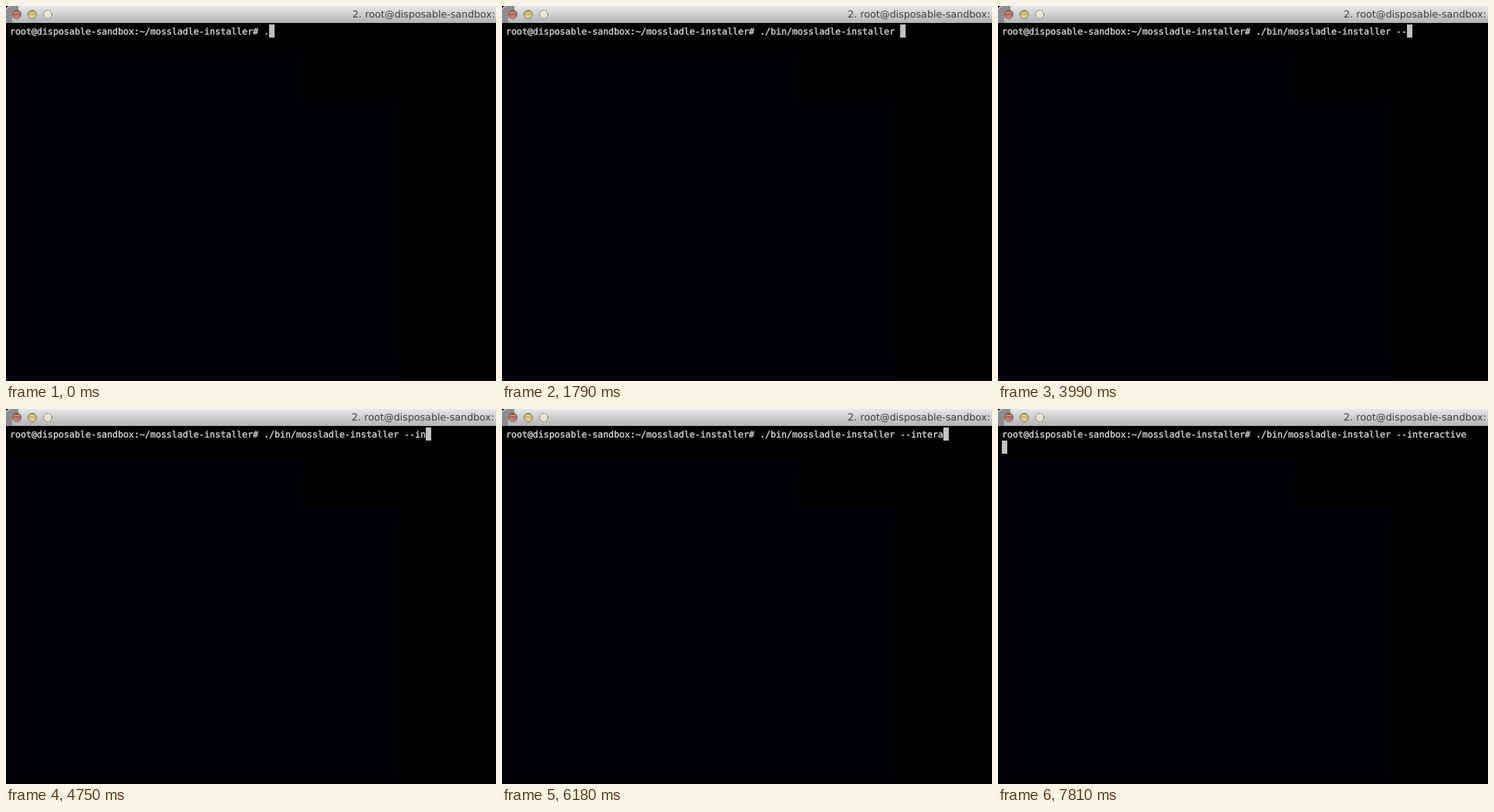
Recreate the animation shown at these times as an HTML page. Size 635 by 487 pixels, loop 8000 ms.

```html
<!DOCTYPE html>
<html lang="en">
<head>
<meta charset="utf-8">
<title>Terminal</title>
<style>
  html, body { margin: 0; width: 100%; height: 100%; overflow: hidden; background: #000; }
  #stage { position: relative; width: 635px; height: 487px; overflow: hidden; }
  svg { position: absolute; left: 0; top: 0; }
  #title {
    position: absolute; left: 448px; top: 2px;
    font: 12.73px/19px "DejaVu Sans", sans-serif;
    color: #404040; white-space: pre; text-rendering: geometricPrecision;
  }
  #shell {
    position: absolute; left: 5px; top: 25px; margin: 0;
    font: 11.635px/17px "DejaVu Sans Mono", monospace;
    color: #d2d2d2; -webkit-text-stroke: .4px #d2d2d2;
    text-rendering: geometricPrecision; font-variant-ligatures: none;
  }
  #cursor { position: absolute; width: 7px; height: 17px; background: #c2c2c2; }
</style>
</head>
<body>
<div id="stage">
  <svg width="635" height="487">
    <defs>
      <linearGradient id="bar" x2="0" y2="1">
        <stop offset="0" stop-color="#e9e9e9"/>
        <stop offset="1" stop-color="#b3b3b3"/>
      </linearGradient>
      <linearGradient id="red" x2="0" y2="1">
        <stop offset="0" stop-color="#8d4a42"/>
        <stop offset="1" stop-color="#d9917f"/>
      </linearGradient>
      <linearGradient id="amber" x2="0" y2="1">
        <stop offset="0" stop-color="#b39a58"/>
        <stop offset="1" stop-color="#f0e2a6"/>
      </linearGradient>
    </defs>
    <path d="M0 64H384V128H512V487H0Z" fill="#00000a"/>
    <rect width="635" height="22" fill="url(#bar)"/>
    <path d="M0 0H16V8H8V22H0Z" fill="#8c8c8c"/>
    <path d="M0 0H4Q1 1 0 4Z" fill="#111"/>
    <path d="M0 5Q1 1 5 .5" fill="none" stroke="#eee"/>
    <circle cx="14" cy="11" r="5.5" fill="url(#red)" stroke="#7c5650"/>
    <circle cx="34" cy="11" r="5.5" fill="url(#amber)" stroke="#85734a"/>
    <circle cx="54" cy="11" r="5.5" fill="#e6e3cf" stroke="#55554a" stroke-dasharray="2 1.5"/>
    <path d="M11 8.5h6M31 8.5h6M51 8.5h6" stroke="#fff" stroke-opacity=".55" stroke-linecap="round"/>
  </svg>
  <div id="title">2. root@disposable-sandbox: ~</div>
  <pre id="shell"></pre>
  <div id="cursor"></div>
</div>
<script>
const LOOP = 8000, LEFT = 5, TOP = 24, CELL = 7, LINE = 17;
const prompt = "root@disposable-sandbox:~/mossladle-installer# ";
const command = "./bin/mossladle-installer --interactive\n";

// [time, characters typed]: the path and program name are tab-completed
const keys = [[0, 1], [1140, 2], [1330, 3], [1570, 6], [1790, 26]];
[2830, 3990, 4320, 4750, 5030, 5170, 5500, 6180, 6520, 6800, 7010, 7200, 7360, 7810]
  .forEach((time, i) => keys.push([time, 27 + i]));

// [time, left edge of the window title]
const titles = [[0, 449], [1140, 448], [5030, 457], [5500, 448], [6520, 457], [7010, 448]];

const [title, shell, cursor] = ["title", "shell", "cursor"].map(id => document.getElementById(id));
const valueAt = (steps, t) => steps.findLast(([time]) => time <= t)[1];

let start;
function draw(now) {
  start ??= now;
  const t = (now - start) % LOOP;
  const text = prompt + command.slice(0, valueAt(keys, t));
  const lines = text.split("\n");
  shell.textContent = text;
  cursor.style.left = LEFT + CELL * lines.at(-1).length + "px";
  cursor.style.top = TOP + LINE * (lines.length - 1) + "px";
  title.style.left = valueAt(titles, t) + "px";
  requestAnimationFrame(draw);
}
draw(performance.now());
</script>
</body>
</html>
```
